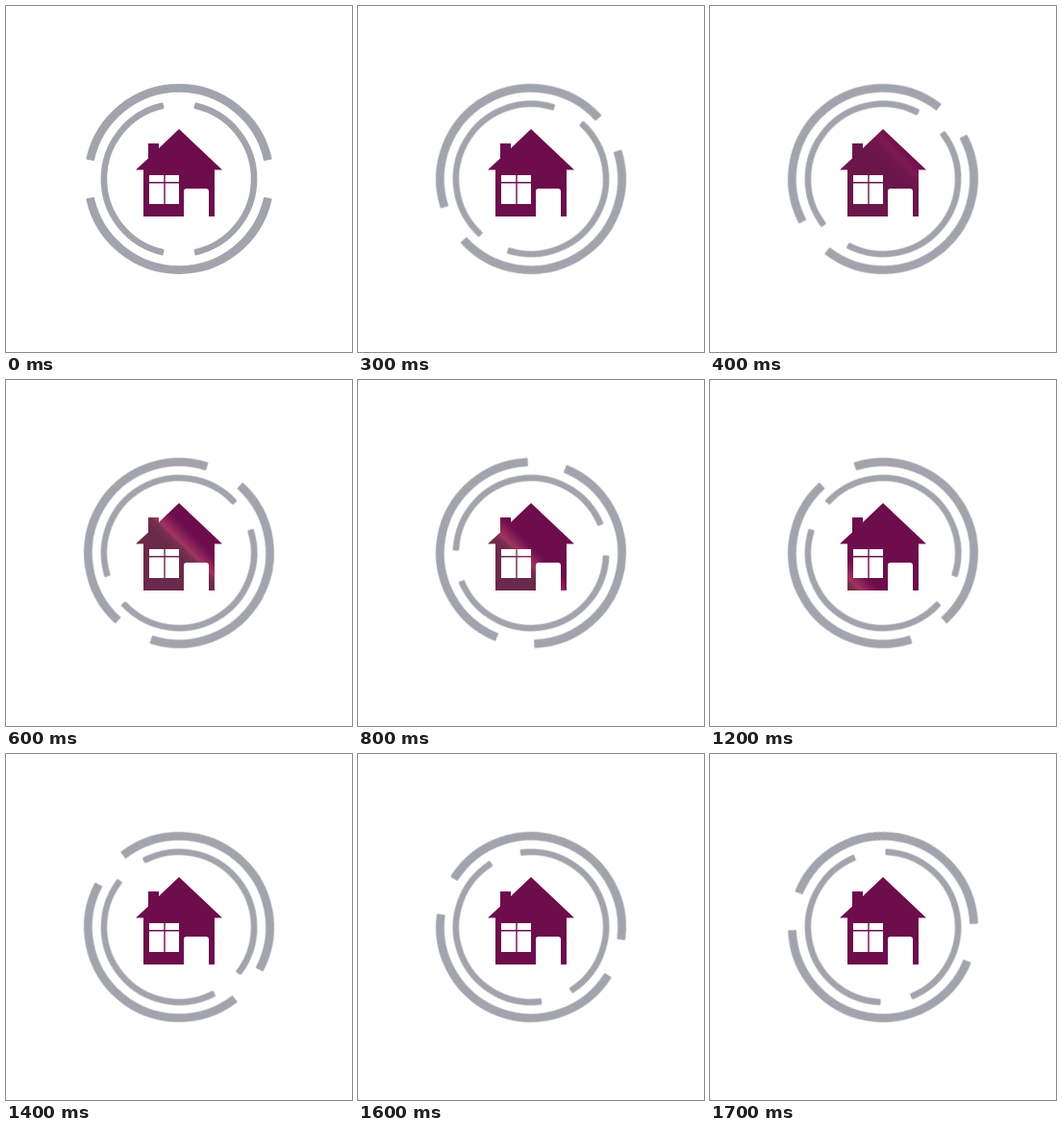
Recreate the animation shown at these times as an HTML page. Size 360x360 px, loop 1.8 s.

```html
<!DOCTYPE html>
<html lang="en">
<head>
<meta charset="utf-8">
<title>House loader</title>
<style>
  html, body { margin: 0; width: 100%; height: 100%; overflow: hidden; background: #fff; }
  svg { display: block; width: 100vw; height: 100vh; }
  .ring {
    fill: #a2a4ad; stroke: #a2a4ad; stroke-width: 2.4; stroke-linejoin: round;
    transform-origin: 180px 180px;
    animation: turn 1.8s steps(18) infinite;
  }
  .outer { --to: -180deg; }
  .inner { --to: 180deg; }
  .shine { animation: sweep 1.8s steps(18) infinite, fade 1.8s infinite; }
  @keyframes turn { to { transform: rotate(var(--to)); } }
  @keyframes sweep {
    from { transform: translate(43.5px, -43.5px); }
    to { transform: translate(-69px, 69px); }
  }
  @keyframes fade {
    0% { opacity: 0; animation-timing-function: step-end; }
    16.6667% { opacity: 0; animation-timing-function: steps(3); }
    33.3333% { opacity: 1; animation-timing-function: step-end; }
    66.6667% { opacity: 1; animation-timing-function: steps(2); }
    77.7778%, 100% { opacity: 0; }
  }
</style>
</head>
<body>
<svg viewBox="0 0 360 360">
  <defs>
    <linearGradient id="glow" gradientUnits="userSpaceOnUse" x1="193" y1="167" x2="173" y2="187">
      <stop offset="0" stop-color="#6d0d4c" stop-opacity="0"/>
      <stop offset=".3" stop-color="#7f1a54"/>
      <stop offset=".62" stop-color="#a2365f"/>
      <stop offset=".75" stop-color="#7a2f50"/>
      <stop offset="1" stop-color="#6a2a4a"/>
    </linearGradient>
    <clipPath id="house">
      <path clip-rule="evenodd" d="M180 128L225 170.5H217V219H211V193Q211 190 208 190H188Q185 190 185 193V219H143V170.5H135L148 158.5V143H159V148Z
        M149 176V183H164.3V176Z M165.7 176V183H180V176Z
        M149 184.6V206H164.3V184.6Z M165.7 184.6V206H180V184.6Z"/>
    </clipPath>
  </defs>
  <path class="ring outer"/>
  <path class="ring inner"/>
  <g clip-path="url(#house)">
    <rect width="360" height="360" fill="#6d0d4c"/>
    <rect class="shine" x="-200" y="-200" width="760" height="760" fill="url(#glow)"/>
  </g>
</svg>
<script>
  const point = (r, deg) => {
    const a = deg * Math.PI / 180;
    return `${180 + r * Math.cos(a)} ${180 + r * Math.sin(a)}`;
  };

  // Half ring between two radii, opening at angle `from`.
  const band = (r1, r2, from, to) =>
    `M${point(r2, from)}A${r2} ${r2} 0 0 1 ${point(r2, to)}` +
    `L${point(r1, to)}A${r1} ${r1} 0 0 0 ${point(r1, from)}Z`;

  // Two opposite bands; the outline stroke rounds their corners.
  function drawRing(name, r1, r2, gapAt) {
    const gap = 12.7;
    const d = [0, 180].map(a => band(r1 + 1.2, r2 - 1.2, gapAt + a + gap, gapAt + a + 180 - gap));
    document.querySelector(name).setAttribute('d', d.join(''));
  }

  drawRing('.outer', 90.2, 99, 0);
  drawRing('.inner', 74.8, 81.4, 90);
</script>
</body>
</html>
```
